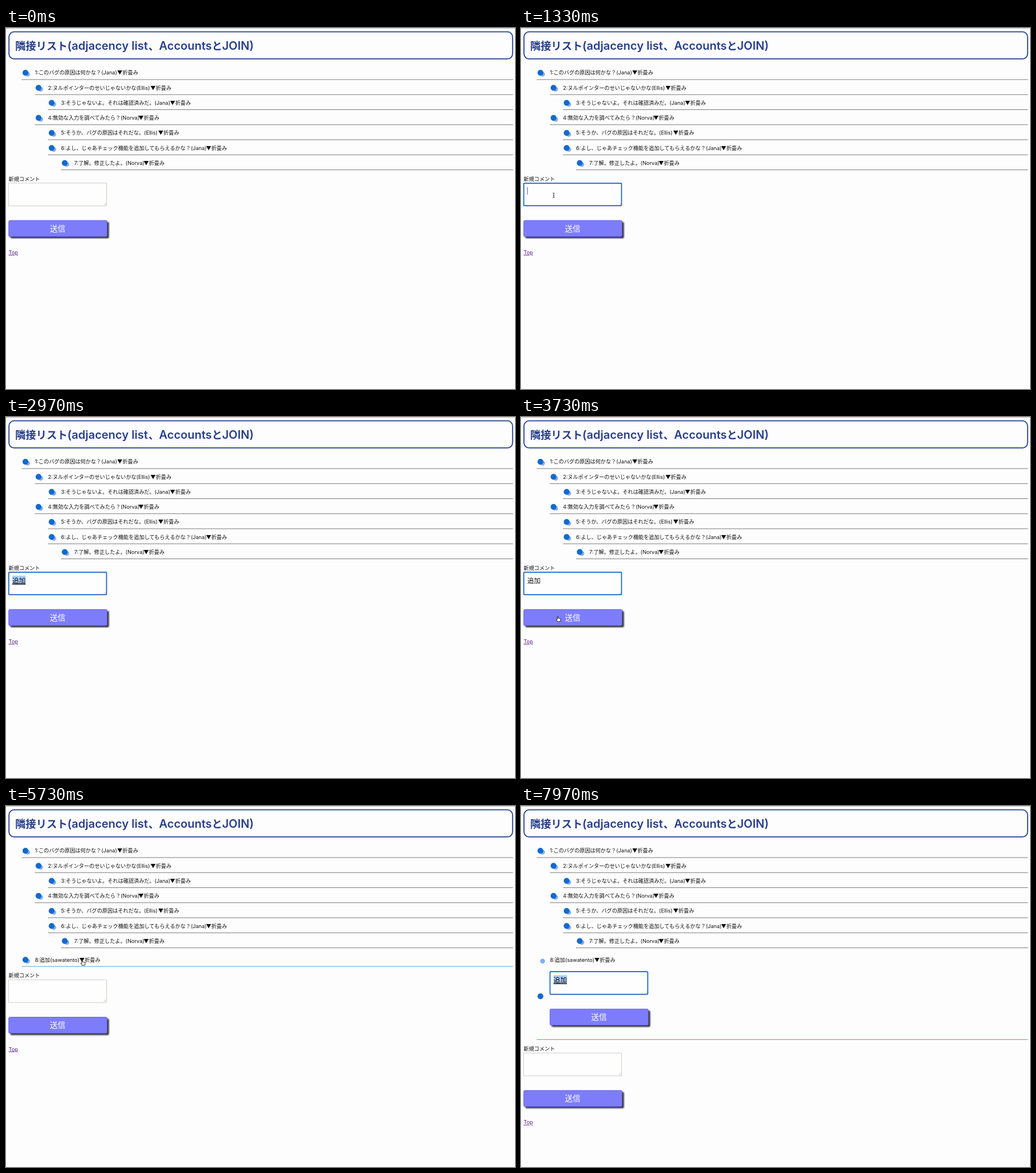
Animation, 888 px wide and 630 px high, one loop 8 s. Source, as an HTML page:

```html
<!DOCTYPE html>
<html lang="ja">
<head>
<meta charset="utf-8">
<title>隣接リスト</title>
<style>
  html, body { margin: 0; width: 100%; height: 100%; overflow: hidden; background: #fdfdfd; }
  svg { display: block; width: 888px; height: 630px; }
  text { font: 9.14px Inter, "Noto Sans CJK JP", "Noto Sans CJK", sans-serif; fill: #111; white-space: pre; }
  .cjk { font-family: "Noto Sans CJK JP", "Noto Sans CJK", sans-serif; }
  .title { font-size: 20px; font-weight: 600; fill: #283e8c; }
  .title.cjk { font-size: 18.3px; font-weight: 700; }
  .input { font-size: 11.7px; }
  .send { font-size: 13.7px; fill: #fff; text-anchor: middle; }
  .link { fill: #551a8b; text-decoration: underline; }
  .pick { font: 9.3px "Noto Serif", "Noto Serif CJK JP", "Noto Sans CJK JP", serif; fill: #222; }
  .hint { font-size: 4.97px; fill: #555; }
</style>
</head>
<body>
<svg viewBox="0 0 888 630">
  <defs>
    <filter id="soft" x="-20%" y="-20%" width="140%" height="150%"><feGaussianBlur stdDeviation="0.8"/></filter>
    <filter id="glow" x="-20%" y="-20%" width="140%" height="140%"><feGaussianBlur stdDeviation="2.2"/></filter>
  </defs>
  <rect width="888" height="630" fill="#fdfdfd"/>
  <g id="page"></g>
  <g id="cursor">
    <path id="arrow" d="M0 0V9.6L2.2 7.6L3.7 11L5.2 10.3L3.8 7.1H6.8Z" fill="#111" stroke="#fff" stroke-width=".7"/>
    <path id="beam" d="M-1.7 -4Q0 -4 0 -3V3Q0 4 -1.7 4M1.7 -4Q0 -4 0 -3M0 3Q0 4 1.7 4M-.9 .8H.9" fill="none" stroke="#222" stroke-width=".9"/>
    <path id="hand" d="M-.8 .5Q0 -.5 .8 .5V3.2Q1.9 2.6 2.4 3.5Q3.4 3 3.9 4Q5 3.8 5 5V7L4.2 9H-.2L-2.6 5.8Q-2.4 4.4 -.8 5.6Z" fill="#fff" stroke="#111" stroke-width=".9" stroke-linejoin="round"/>
  </g>
</svg>
<script>
const LOOP = 8000, EM = 9.14, INPUT_EM = 11.7;
const SUBMIT = 3950, OPEN = 6080;
const $ = id => document.getElementById(id);

// depth, text, y of the text middle, x of the fold toggle
const comments = [
  [0, '1:このバグの原因は何かな？(Jana)', 194],
  [1, '2:ヌルポインターのせいじゃないかな(Ellis)', 252],
  [2, '3:そうじゃないよ。それは確認済みだ。(Jana)', 286],
  [1, '4:無効な入力を調べてみたら？(Norva)', 231],
  [2, '5:そうか、バグの原因はそれだな。(Ellis)', 265.5],
  [2, '6:よし、じゃあチェック機能を追加してもらえるかな？(Jana)', 349],
  [3, '7:了解。修正したよ。(Norva)', 240]
];
const picks = ['追加で', '追加の', 'Tuilark', '着いたら', 'ツイラーク'];

// time, text, input mode
const firstInput = [
  [1270, '', ''], [1800, 'ｔ', 'compose'], [1950, 'つ', 'compose'], [2250, 'つい', 'compose'],
  [2600, 'ついｋ', 'compose'], [2700, 'ついか', 'compose'], [2850, '追加', 'convert'], [3050, '追加', '']
];
const replyInput = [
  [6800, '', ''], [7200, 'ｔ', 'compose'], [7300, 'つ', 'compose'], [7450, 'つい', 'compose'],
  [7600, 'ついｋ', 'compose'], [7680, 'ついか', 'compose'], [7820, '追加', 'convert']
];

// time, x, y
const path = [
  [880, 140, 640], [1200, 57, 292], [3300, 57, 292], [3650, 64, 348],
  [4500, 64, 348], [5400, 133, 269], [6250, 133, 269], [6650, 113, 308]
];

const text = (x, y, s, cls = '') => `<text x="${x}" y="${y}" class="${cls}">${s}</text>`;
const rect = (x, y, w, h, attrs) => `<rect x="${x}" y="${y}" width="${w}" height="${h}" ${attrs}/>`;
const line = (x1, y1, x2, y2, color, w = 0.9) =>
  `<path d="M${x1} ${y1}L${x2} ${y2}" stroke="${color}" stroke-width="${w}" fill="none"/>`;
const dot = (x, y, r, color) => `<circle cx="${x}" cy="${y}" r="${r}" fill="${color}"/>`;

function comment(depth, label, toggleX, y, lineY, color, dotY = y) {
  const x = 27.4 + depth * 22.85;
  return dot(x + 10.2, y + 2.6, 4.2, '#84aeeb') + dot(x + 6.5, dotY + 0.1, 5.1, '#1269cf') +
    text(x + 23, y + 3.4, label) + text(toggleX, y + 3.4, '▼折畳み', 'cjk') +
    line(x, lineY, 884.5, lineY, color);
}

function popup(x, y) {
  return rect(x, y + 2, 90.5, 104, 'rx="2.5" fill="#000" opacity=".38" filter="url(#glow)"') +
    rect(x, y, 90.5, 104, 'rx="2" fill="#fdfdfd" stroke="#ccc" stroke-width=".5"') +
    picks.map((s, i) => text(x + 5, y + 12.4 + i * 18.2, s, 'pick')).join('') +
    rect(x + 85.5, y, 5, 92, 'fill="#f1f1f1"') + rect(x + 86.5, y + 1, 3, 46, 'rx="1.5" fill="#c6c6c6"') +
    rect(x, y + 92, 90.5, 12, 'rx="1.5" fill="#e3dde2"') +
    text(x + 6, y + 99.6, 'Tabキーで予測された単語を選択', 'cjk hint');
}

function form(x, y, input) {
  let s = rect(x, y, 171, 39.8, 'fill="#fefefe" stroke="#c9c9c4" stroke-width=".9"');
  s += line(x + 166, y + 38.5, x + 170, y + 34.5, '#999', 0.6) + line(x + 168.3, y + 38.5, x + 170, y + 36.8, '#999', 0.6);
  s += rect(x + 3, y + 68, 172, 28.5, 'rx="2" fill="#333" filter="url(#soft)"') +
    rect(x + 0.2, y + 65.3, 171.5, 28.2, 'rx="2" fill="#7d7dfc" stroke="#5858ea" stroke-width=".9"') +
    text(x + 85.5, y + 84.2, '送信', 'cjk send');
  if (!input) return s;
  const w = input.value.length * INPUT_EM, tx = x + 6.3;
  s += rect(x + 0.2, y + 0.2, 170.6, 39.4, 'rx="1.5" fill="none" stroke="#1764c6" stroke-width="1.7"');
  if (input.mode === 'convert') s += rect(tx, y + 6.3, w, 15.8, 'fill="#a8cdf7"');
  s += text(tx, y + 18.9, input.value, 'cjk input');
  if (input.mode) s += line(tx, y + 21, tx + w, y + 21, '#111', input.mode === 'convert' ? 1.3 : 0.8);
  if (input.caret) s += line(tx + w + 0.4, y + 7.2, tx + w + 0.4, y + 20, '#333', 0.8);
  if (input.mode === 'compose') s += popup(x + 1.5, y + 24.4);
  return s;
}

function inputAt(steps, t) {
  const step = steps.filter(s => s[0] <= t).pop();
  if (!step) return null;
  const [start, value, mode] = step;
  const blink = Math.floor((t - start) / 500) % 2 === 0;
  return { value, mode, caret: mode === 'compose' || (!mode && blink) };
}

const header = line(0, 0.5, 888, 0.5, '#bdbdbd', 1.2) +
  rect(5.2, 6.7, 878.6, 47.2, 'rx="9" fill="none" stroke="#24418f" stroke-width="1.8"') +
  text(16, 37.5, '隣接リスト', 'title cjk') + text(107, 37.5, '(adjacency list', 'title') +
  text(248.5, 37.5, '、', 'title cjk') + text(267, 37.5, 'Accounts', 'title') +
  text(359, 37.5, 'と', 'title cjk') + text(377, 37.5, 'JOIN)', 'title') +
  comments.map(([depth, label, toggleX], i) =>
    comment(depth, label, toggleX, 78 + i * 26.25, 90 + i * 26.25, '#6c6c6c')).join('');

function page(t) {
  const added = t >= SUBMIT, open = t >= OPEN;
  const shift = open ? 160.5 : added ? 32.6 : 0;
  let s = header;
  if (added) s += comment(0, '8:追加(sawatento)', 128, 268.2, open ? 407.6 : 280, '#2e9fdc', open ? 332 : 268.2);
  s += text(4.5, 266.8 + shift, '新規コメント', 'cjk') + text(4.5, 394.9 + shift, 'Top', 'link');
  s += form(4.6, 270.6 + shift, added ? null : inputAt(firstInput, t));
  if (open) s += form(50.4, 289 , inputAt(replyInput, t));
  return s;
}

function cursorAt(t) {
  const hidden = t < path[0][0] || (t >= 1800 && t < 3300) || t >= 7200;
  if (hidden) return null;
  let i = path.length - 1;
  while (path[i][0] > t) i--;
  const a = path[i], b = path[i + 1] || a;
  const p = b === a ? 0 : (t - a[0]) / (b[0] - a[0]);
  const e = p * p * (3 - 2 * p);
  return [a[1] + (b[1] - a[1]) * e, a[2] + (b[2] - a[2]) * e];
}

function cursorKind(t, x, y) {
  const inside = (l, top, w, h) => x >= l && x <= l + w && y >= top && y <= top + h;
  const forms = [[4.6, 270.6 + (t >= OPEN ? 160.5 : t >= SUBMIT ? 32.6 : 0)]];
  if (t >= OPEN) forms.push([50.4, 289]);
  if (forms.some(([l, top]) => inside(l, top, 171, 40))) return 'beam';
  if (forms.some(([l, top]) => inside(l, top + 65, 172, 29))) return 'hand';
  return t >= SUBMIT && inside(128, 262, 4 * EM, 13) ? 'hand' : 'arrow';
}

let shown = '';
function draw(t) {
  const next = page(t);
  if (next !== shown) $('page').innerHTML = shown = next;
  const pos = cursorAt(t);
  $('cursor').style.display = pos ? '' : 'none';
  if (!pos) return;
  const kind = cursorKind(t, ...pos);
  $('cursor').setAttribute('transform', `translate(${pos[0].toFixed(1)} ${pos[1].toFixed(1)})`);
  for (const id of ['arrow', 'beam', 'hand']) $(id).style.display = id === kind ? '' : 'none';
}

const begin = performance.now();
function tick() {
  draw((performance.now() - begin) % LOOP);
  requestAnimationFrame(tick);
}
tick();
</script>
</body>
</html>
```
